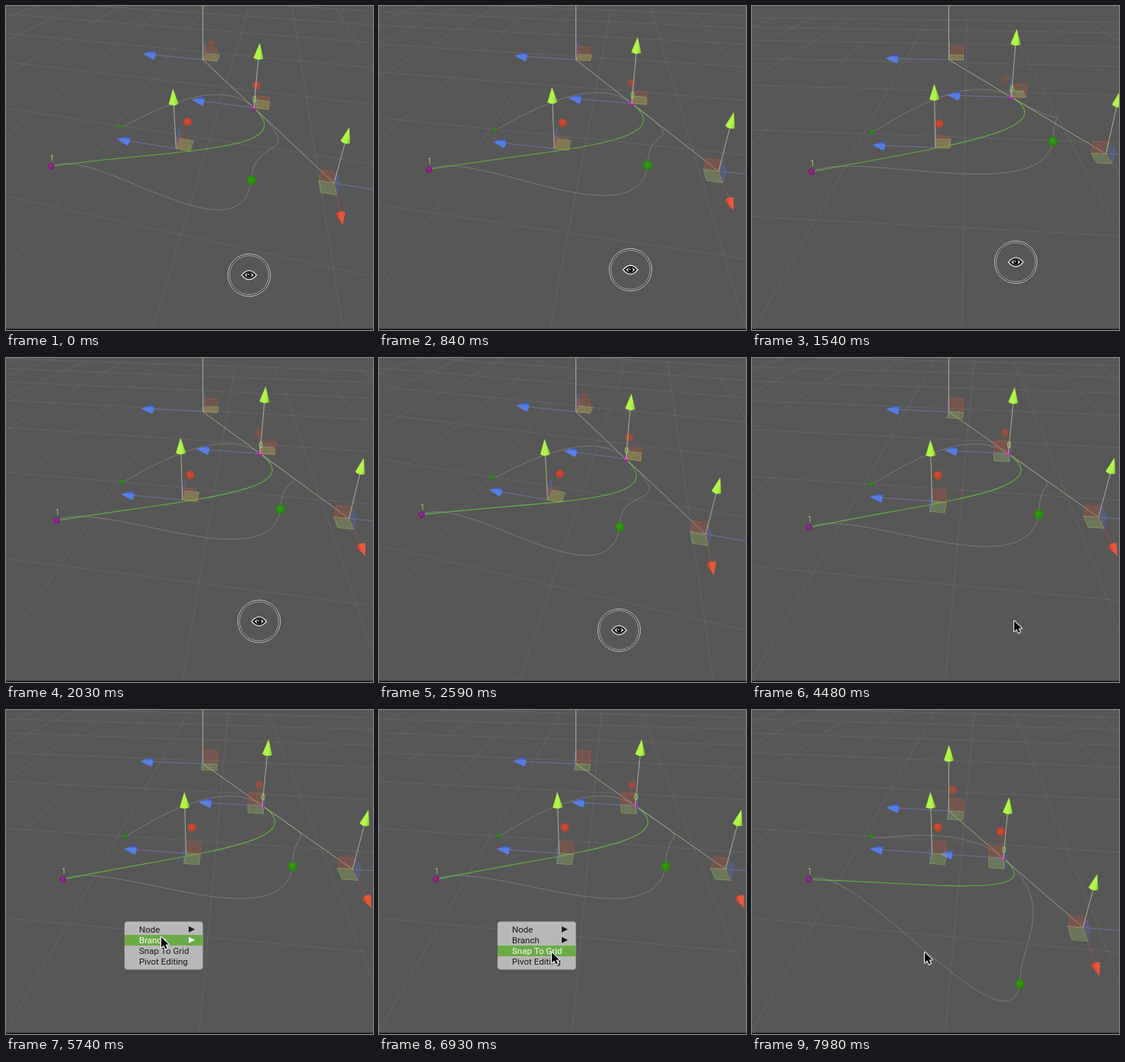
An HTML page with a canvas that plays this animation: 480 px wide and 425 px high, repeating every 8 s.

```html
<!DOCTYPE html>
<html>
<head>
<meta charset="utf-8">
<style>
  html, body { margin: 0; width: 100%; height: 100%; overflow: hidden; background: #575757; }
  canvas { display: block; width: 480px; height: 425px; }
</style>
</head>
<body>
<canvas id="stage"></canvas>
<script>
const W = 480, H = 425, LOOP = 8000, ORBIT_END = 4270, SNAP = 7700;
const PIVOT = [257.5, 70.5], DISTANCE = 390;
const canvas = document.getElementById('stage');
const ratio = window.devicePixelRatio || 1;
canvas.width = W * ratio;
canvas.height = H * ratio;
const ctx = canvas.getContext('2d');

// time, yaw, pitch, pointer x, pointer y
const orbitKeys = [
  [300, 0, .46, 318, 353],
  [1540, .16, .36, 345, 336],
  [2590, -.015, .44, 314, 357],
  [3430, -.015, .455, 316, 349],
  [ORBIT_END, .12, .42, 343, 349]
];
// time, x, y
const cursorKeys = [
  [4800, 343, 345], [5250, 156, 277], [5400, 156, 277],
  [5740, 203, 298], [6400, 215, 326], [6900, 226, 318]
];
const menu = { x: 155, y: 277.5, w: 102.5, h: 63, from: 5320, to: 7640,
  items: ['Node', 'Branch', 'Snap To Grid', 'Pivot Editing'] };

// World space: x right, y down, z towards the viewer.
const world = {
  tangent: [0, 0, 0],
  exit: [109, 29, 173],
  loose: [-30, 64, 95],
  first: [-137, 33, 151],
  small: [-97, 52, 72],
  big: [30, -25, 218]
};
const AXIS_TURN = .22;
const axes = {
  up: [0, -1, 0],
  blue: [-Math.cos(AXIS_TURN), 0, -Math.sin(AXIS_TURN)],
  red: [Math.sin(AXIS_TURN), 0, -Math.cos(AXIS_TURN)]
};
const grid = { y: 73, cell: 122, row: -188, column: -23, far: 560 };
const DROP = 73, BIG_DROP = 120;

const clamp = v => Math.max(0, Math.min(1, v));
const ease = v => v * v * (3 - 2 * v);
const mix = (a, b, k) => a.map((v, i) => v + (b[i] - v) * k);
const add = (a, b, k = 1) => a.map((v, i) => v + b[i] * k);
const dot = (a, b) => a.reduce((sum, v, i) => sum + v * b[i], 0);
const toward = (a, b, k) => mix(a, b, k);

function track(keys, t) {
  const next = keys.findIndex(key => key[0] > t);
  if (next === 0) return keys[0].slice(1);
  if (next < 0) return keys[keys.length - 1].slice(1);
  const [t0, ...a] = keys[next - 1], [t1, ...b] = keys[next];
  return mix(a, b, ease((t - t0) / (t1 - t0)));
}

let yaw, pitch, orbiting;

// Camera space: right, down, distance from the camera.
function toView([x, y, z]) {
  const side = x * Math.cos(yaw) + z * Math.sin(yaw);
  const near = z * Math.cos(yaw) - x * Math.sin(yaw);
  return [side,
    y * Math.cos(pitch) + near * Math.sin(pitch),
    DISTANCE - near * Math.cos(pitch) + y * Math.sin(pitch)];
}
const toScreen = ([x, y, depth]) => [PIVOT[0] + x * DISTANCE / depth, PIVOT[1] + y * DISTANCE / depth];
const project = p => toScreen(toView(p));

function line(a, b, color, width = 1) {
  ctx.strokeStyle = color;
  ctx.lineWidth = width;
  ctx.beginPath();
  ctx.moveTo(...a);
  ctx.lineTo(...b);
  ctx.stroke();
}

function bezier(a, c1, c2, b, color, width) {
  ctx.strokeStyle = color;
  ctx.lineWidth = width;
  ctx.beginPath();
  ctx.moveTo(...a);
  ctx.bezierCurveTo(...c1, ...c2, ...b);
  ctx.stroke();
}

function polygon(points, fill, stroke) {
  ctx.beginPath();
  points.forEach(p => ctx.lineTo(...p));
  ctx.closePath();
  ctx.fillStyle = fill;
  ctx.fill();
  ctx.strokeStyle = stroke;
  ctx.lineWidth = .8;
  ctx.stroke();
}

function ball([x, y], r, light, dark) {
  const shade = ctx.createRadialGradient(x - r * .2, y - r * .3, 0, x, y, r);
  shade.addColorStop(0, light);
  shade.addColorStop(1, dark);
  ctx.fillStyle = shade;
  ctx.beginPath();
  ctx.arc(x, y, r, 0, 7);
  ctx.fill();
}

function cone(origin, tip, height, light, dark, stem) {
  const angle = Math.atan2(tip[1] - origin[1], tip[0] - origin[0]);
  line(origin, add(tip, [Math.cos(angle), Math.sin(angle)], -height), stem, .9);
  ctx.save();
  ctx.translate(...tip);
  ctx.rotate(angle);
  const shade = ctx.createLinearGradient(0, -6.5, 0, 6.5);
  shade.addColorStop(0, light);
  shade.addColorStop(.6, light);
  shade.addColorStop(1, dark);
  ctx.fillStyle = shade;
  ctx.beginPath();
  ctx.moveTo(0, 0);
  ctx.lineTo(2 - height, -6.5);
  ctx.quadraticCurveTo(-height - 2, 0, 2 - height, 6.5);
  ctx.fill();
  ctx.restore();
}

function drawGrid() {
  const { y, cell, row, column, far } = grid;
  const place = (b, r) => toView(add(add([0, y, 0], axes.blue, b), axes.red, r));
  const segment = (a, b) => {
    const near = 25;
    if (a[2] < near && b[2] < near) return;
    if (a[2] < near) a = mix(b, a, (b[2] - near) / (b[2] - a[2]));
    if (b[2] < near) b = mix(a, b, (a[2] - near) / (a[2] - b[2]));
    line(toScreen(a), toScreen(b), 'rgba(122,122,122,.55)', .7);
  };
  for (let r = row; r < far; r += cell) segment(place(-1200, r), place(1200, r));
  for (let i = -8; i <= 8; i++) segment(place(column + i * cell, -500), place(column + i * cell, far));
}

function drawGizmo(position, flip = 1) {
  const view = toView(position);
  const unit = view[2] / DISTANCE;
  const o = toScreen(view);
  const end = (axis, length) => project(add(position, axis, length * unit));
  const blue = axes.blue.map(v => v * flip), red = axes.red.map(v => v * flip);
  const facing = axis => {
    const direction = add(toView(add(position, axis)), view, -1);
    return dot(direction, view) < 0 ? 1 : -1;
  };

  // The plane handles turn to the camera only once the orbit has ended.
  const side = blue.map(v => v * (orbiting ? -1 : facing(blue)));
  const depth = red.map(v => v * (orbiting ? 1 : facing(red)));
  const face = (a, b, rgb) => polygon(
    [o, end(a, 19), end(add(a, b), 19), end(b, 19)], `rgba(${rgb},.3)`, `rgba(${rgb},.6)`);
  face(axes.up, depth, '85,110,190');
  face(side, axes.up, '190,85,60');
  face(side, depth, '155,195,100');

  if (flip < 0) {
    cone(o, end(red, 60), 18, '#e8573a', '#b5371f', 'rgba(180,85,65,.7)');
  } else {
    const cap = end(red, 57);
    ctx.globalAlpha = clamp((Math.hypot(cap[0] - o[0], cap[1] - o[1]) - 22) / 10);
    line(o, cap, 'rgba(170,75,55,.6)', .8);
    ball(cap, 5.5, '#d54f32', '#b8432a');
    ctx.globalAlpha = 1;
  }
  cone(o, end(blue, 84), 17, '#557fe6', '#2b4896', '#6a78aa');
  cone(o, end(axes.up, 92), 22, '#b0f648', '#7cc52c', '#b3bf93');
}

function label(text, [x, y]) {
  ctx.font = '10px Roboto, sans-serif';
  ctx.textAlign = 'center';
  ctx.fillStyle = '#8fdd62';
  ctx.fillText(text, x + 1, y - 7);
  ctx.textAlign = 'left';
}

function drawScene(snapped) {
  const lower = (p, amount) => add(p, [0, snapped ? amount : 0, 0]);
  const tangentAt = lower(world.tangent, DROP), exitAt = lower(world.exit, DROP);
  const nodeAt = mix(tangentAt, exitAt, .5);
  const [tangent, exit, node, first, small, big, entry] = [
    tangentAt, exitAt, nodeAt, world.first, world.small,
    lower(world.big, BIG_DROP), lower(world.loose, DROP * .6)
  ].map(project);
  const gray = '#848484';

  drawGrid();
  bezier(small, add(small, [-8, 12]), toward(node, tangent, .85), node, gray, .8);
  bezier(first, add(first, [57, -30]), add(big, [-16, 245 * Math.sin(pitch)]), big, gray, .8);
  bezier(big, add(big, [0, -59]), toward(node, exit, .7), node, gray, .8);
  bezier(node, toward(node, exit, .6), entry, first, '#5fb33e', 1.1);
  line(tangent, exit, 'rgba(205,192,145,.8)', .9);
  ball(small, 3, '#319a1c', '#23760f');
  ball(first, 4.2, '#a52a9f', '#781772');
  ball(node, 3.5, '#cf2bc0', '#a01c94');
  drawGizmo(tangentAt);
  drawGizmo(nodeAt);
  drawGizmo(world.loose);
  drawGizmo(exitAt, -1);
  ball(big, 6.3, '#37a418', '#28800e');
  label('1', first);
  label('0', node);
}

function drawEye([x, y]) {
  const ring = (r, color, width) => {
    ctx.strokeStyle = color;
    ctx.lineWidth = width;
    ctx.beginPath();
    ctx.arc(0, 0, r, 0, 7);
    ctx.stroke();
  };
  const almond = (w, h, color) => {
    ctx.fillStyle = color;
    ctx.beginPath();
    ctx.moveTo(-w, 0);
    ctx.quadraticCurveTo(0, -2 * h, w, 0);
    ctx.quadraticCurveTo(0, 2 * h, -w, 0);
    ctx.fill();
  };
  ctx.save();
  ctx.translate(x, y);
  ring(26.7, '#3c3c3c', 3);
  ring(27.8, '#dedede', .9);
  ring(25.6, '#c8c8c8', .8);
  almond(10.5, 6.5, '#eee');
  almond(8.8, 5.2, '#0c0c0c');
  almond(6, 3.4, '#ddd');
  ball([0, 0], 3.2, '#000', '#0c0c0c');
  ball([-.8, -.8], .9, '#fff', '#ddd');
  ctx.restore();
}

function drawCursor([x, y]) {
  ctx.beginPath();
  [[0, 0], [0, 13.5], [3.2, 10.6], [5.4, 15.6], [7.8, 14.5], [5.6, 9.7], [9.8, 9.5]]
    .forEach(p => ctx.lineTo(x + p[0], y + p[1]));
  ctx.closePath();
  ctx.lineJoin = 'round';
  ctx.lineWidth = 2;
  ctx.strokeStyle = '#fff';
  ctx.stroke();
  ctx.fillStyle = '#000';
  ctx.fill();
  ctx.lineJoin = 'miter';
}

function drawMenu(cursor) {
  ctx.fillStyle = '#b8b8b8';
  ctx.beginPath();
  ctx.roundRect(menu.x, menu.y, menu.w, menu.h, 4);
  ctx.fill();
  ctx.font = '11.5px Roboto, sans-serif';
  menu.items.forEach((item, i) => {
    const top = menu.y + 3.5 + i * 14;
    const active = cursor[1] >= top && cursor[1] < top + 14;
    if (active) {
      ctx.fillStyle = '#6bab46';
      ctx.fillRect(menu.x, top, menu.w, 14);
    }
    ctx.fillStyle = active ? '#fff' : '#161616';
    ctx.fillText(item, 174, top + 11);
    if (i < 2) {
      ctx.beginPath();
      ctx.moveTo(239, top + 2.7);
      ctx.lineTo(247, top + 6.7);
      ctx.lineTo(239, top + 10.7);
      ctx.fill();
    }
  });
}

function draw(t) {
  const [turn, tilt, ...eye] = track(orbitKeys, t);
  yaw = turn;
  pitch = tilt;
  orbiting = t < ORBIT_END;
  ctx.setTransform(ratio, 0, 0, ratio, 0, 0);
  ctx.fillStyle = '#575757';
  ctx.fillRect(0, 0, W, H);
  drawScene(t >= SNAP);
  if (orbiting) {
    drawEye(eye);
  } else {
    const cursor = track(cursorKeys, t);
    if (t >= menu.from && t < menu.to) drawMenu(cursor);
    drawCursor(cursor);
  }
  ctx.fillStyle = '#0c0c0c';
  ctx.fillRect(0, 423.5, W, 1.5);
}

const start = performance.now();
function tick() {
  draw((performance.now() - start) % LOOP);
  requestAnimationFrame(tick);
}
tick();
</script>
</body>
</html>
```
